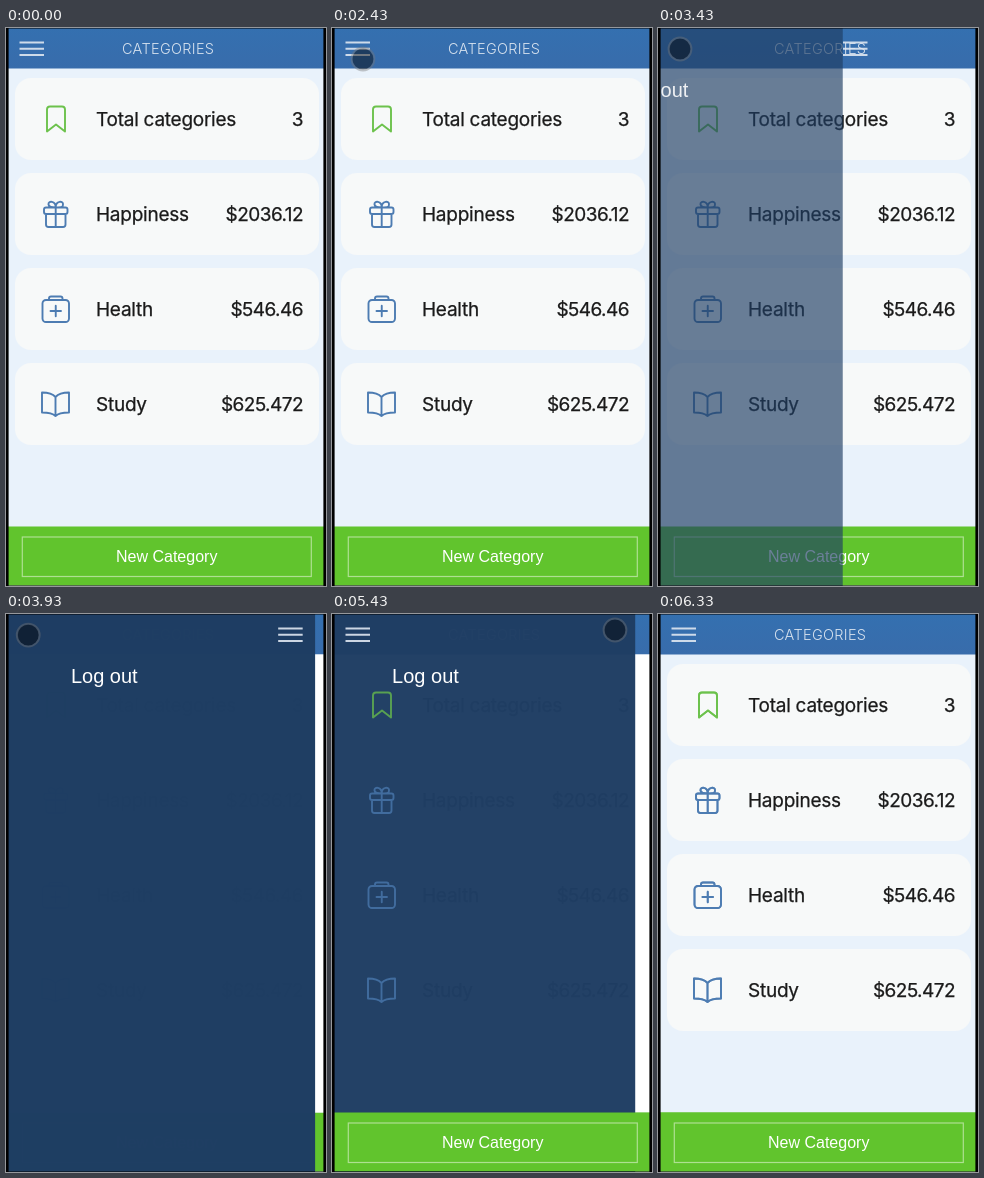
Write an HTML page that moves like this. It is 320x558 px and loops after 6.43 s.

```html
<!DOCTYPE html>
<html lang="en">
<head>
<meta charset="utf-8">
<title>Categories</title>
<style>
  html, body { margin: 0; width: 100%; height: 100%; overflow: hidden; background: #000; }
  svg { display: block; width: 100vw; height: 100vh; }
  .row { font: 400 19px Inter, "Open Sans", sans-serif; letter-spacing: -.25px; fill: #1a1a1a; stroke: #1a1a1a; stroke-width: .25; }
  .title { font: 300 14.5px Inter, "Open Sans", sans-serif; letter-spacing: .3px; fill: #fff; fill-opacity: .8; }
  .ui { font-family: "Liberation Sans", Arial, sans-serif; fill: #fff; }
  .end { text-anchor: end; letter-spacing: -.55px; }
  .icon { fill: none; stroke: #4d7cb2; stroke-width: 1.9; stroke-linejoin: round; stroke-linecap: round; }
  .bars { stroke: #dfe7f1; stroke-width: 2; stroke-opacity: .9; }
</style>
</head>
<body>
<svg viewBox="0 0 320 558">
  <defs>
    <linearGradient id="sky" x2="0" y2="1">
      <stop offset="0" stop-color="#3470b0"/>
      <stop offset="1" stop-color="#386cab"/>
    </linearGradient>
    <g id="icons" class="icon">
      <path stroke="#6cc24c" d="M41 103.5V81.5Q41 78.5 44 78.5H56Q59 78.5 59 81.5V103.5L50 96.5Z"/>
      <path d="M40 179.5H59.5Q61.5 179.5 61.5 181.5V184Q61.5 186 59.5 186H40Q38 186 38 184V181.5Q38 179.5 40 179.5Z
               M40 186V196.5Q40 199 42.5 199H57Q59.5 199 59.5 196.5V186 M49.7 179V199
               M49.7 179.5C49.7 172.5 42 172.5 42.5 176.5Q43 179.5 49.7 179.5C56.5 179.5 57 179 57 176.5C57.5 172.5 49.7 172.5 49.7 179.5"/>
      <rect x="36.5" y="272" width="26.5" height="22" rx="3.5"/>
      <path d="M43 272V270.5Q43 268.5 45 268.5H54.5Q56.5 268.5 56.5 270.5V272 M44.5 283H55M49.75 277.8V288.2"/>
      <path d="M49.5 369C46 365 40.5 364.5 36 364.5V384.5C42 384.5 46.5 385 49.5 388C52.5 385 57 384.5 63 384.5V364.5C58.5 364.5 53 365 49.5 369V388"/>
    </g>
    <g id="button">
      <rect x="2" y="498.5" width="316" height="59" fill="#61c42d"/>
      <rect x="16.3" y="509" width="289" height="39.5" fill="none" stroke="#aee092" stroke-width="1.2"/>
      <text class="ui" x="110" y="534" font-size="16">New Category</text>
    </g>
  </defs>

  <rect width="320" height="558" fill="#e9f2fb"/>
  <rect width="320" height="40.5" fill="url(#sky)"/>
  <text class="title" x="116" y="25.5">CATEGORIES</text>
  <g id="rows"></g>
  <use href="#icons"/>
  <use href="#button"/>
  <rect id="strip" x="302" y="40.5" width="16" height="458" fill="#fff"/>

  <rect id="panel" x="2" y="0" height="558" fill="#1f3e63"/>
  <text id="logout" class="ui" y="69" font-size="20">Log out</text>
  <g id="raised">
    <use href="#icons" opacity=".75"/>
    <use href="#button"/>
  </g>
  <path id="bars" class="bars" d="M13.5 14.5H38M13.5 20.7H38M13.5 27H38"/>
  <g id="cursor">
    <circle r="10.6" fill-opacity=".45"/>
    <circle r="11.4" fill="none" stroke="#777" stroke-width="2" stroke-opacity=".4"/>
  </g>
  <path d="M0 0H2.6V558H0ZM317.4 0H320V558H317.4ZM0 0H320V.6H0ZM0 557.4H320V558H0Z"/>
</svg>
<script>
const LOOP = 6430;
const OPEN = { start: 3062, length: 960 };
const CLOSE = { start: 5395, length: 1000, shown: 5430 };
const FADE = { start: 6100, end: 6330 };
// time, x, y
const PATH = [
  [1830, 257, 142], [2430, 31, 31], [2530, 29, 29], [2800, 22, 21],
  [3930, 22, 21], [4230, 92, 31], [4600, 200, 34], [4970, 281, 18], [5130, 283, 16]
];
const ROWS = [
  ["Total categories", "3"],
  ["Happiness", "$2036.12"],
  ["Health", "$546.46"],
  ["Study", "$625.472"]
];

const el = id => document.getElementById(id);
const set = (id, attrs) => {
  for (const key in attrs) el(id).setAttribute(key, attrs[key]);
};
const clamp = v => Math.min(1, Math.max(0, v));

el("rows").innerHTML = ROWS.map(([name, value], i) => {
  const y = 50 + i * 95;
  return `<rect x="9" y="${y}" width="304" height="82" rx="16" fill="#f7f9f9"/>
    <text class="row" x="90" y="${y + 48}">${name}</text>
    <text class="row end" x="297" y="${y + 48}">${value}</text>`;
}).join("");

// cubic-bezier(.25, .1, .25, 1)
function ease(x) {
  x = clamp(x);
  if (x === 0 || x === 1) return x;
  const curve = (s, a, b) => 3 * s * (1 - s) ** 2 * a + 3 * s * s * (1 - s) * b + s ** 3;
  let lo = 0, hi = 1;
  for (let i = 0; i < 24; i++) {
    const mid = (lo + hi) / 2;
    if (curve(mid, .25, .25) < x) lo = mid; else hi = mid;
  }
  return curve(lo, .1, 1);
}

const progress = (t, move) => ease((t - move.start) / move.length);

function cursorAt(t) {
  const i = PATH.findIndex(point => point[0] > t);
  if (i < 0) return PATH[PATH.length - 1].slice(1);
  const [t0, x0, y0] = PATH[Math.max(0, i - 1)];
  const [t1, x1, y1] = PATH[i];
  const k = t1 > t0 ? clamp((t - t0) / (t1 - t0)) : 0;
  return [x0 + (x1 - x0) * k, y0 + (y1 - y0) * k];
}

function draw(t) {
  const closing = t >= CLOSE.shown;
  const open = closing ? 1 - progress(t, CLOSE) : progress(t, OPEN);
  const edge = -60 + 371 * open;

  set("panel", { width: Math.max(0, edge - 2), opacity: open });
  set("logout", { x: 64 + (edge - 308) * .8145, opacity: clamp(open * 1.35) });
  set("strip", { opacity: clamp((open - .85) / .1) });
  set("raised", { display: closing ? "inline" : "none" });
  set("bars", { transform: `translate(${closing ? 0 : 260 * open} 0)` });

  const fade = 1 - clamp((t - FADE.start) / (FADE.end - FADE.start));
  set("cursor", {
    transform: `translate(${cursorAt(t)})`,
    opacity: t < PATH[0][0] ? 0 : fade
  });
}

const begin = performance.now();
function tick() {
  draw((performance.now() - begin) % LOOP);
  requestAnimationFrame(tick);
}
tick();
</script>
</body>
</html>
```
